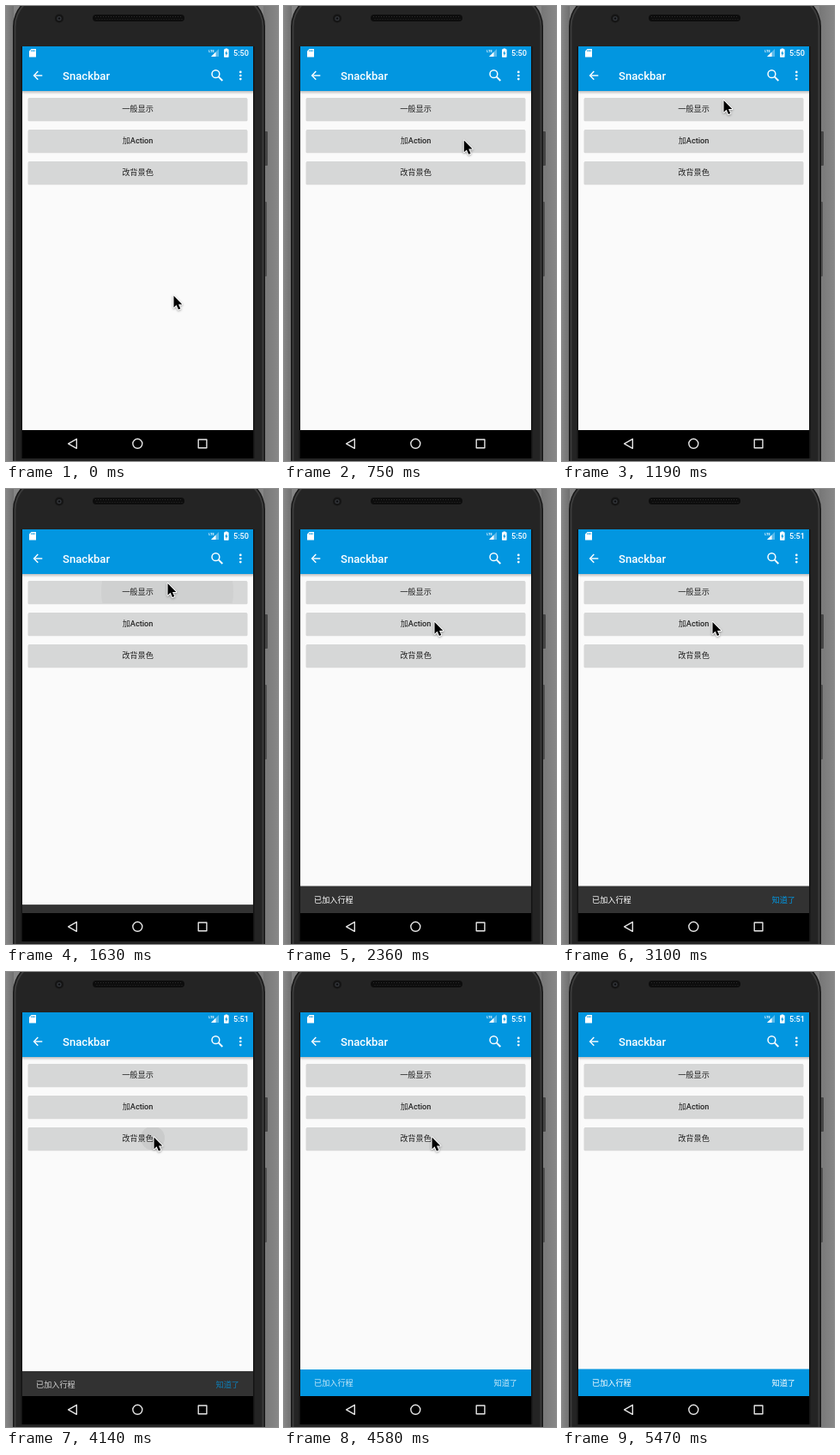
An HTML page with a canvas that plays this animation: 317x530 px, repeating every 5780 ms.

```html
<!DOCTYPE html>
<html lang="zh">
<head>
<meta charset="utf-8">
<title>Snackbar</title>
<style>
html, body { margin: 0; width: 100%; height: 100%; overflow: hidden; background: #858585; }
canvas { display: block; width: 317px; height: 530px; }
</style>
</head>
<body>
<canvas id="stage"></canvas>
<script>
const W = 317, H = 530, LOOP = 5780;
const BLUE = '#0296e0', DARK = '#323232', WHITE = '#fff';
const LATIN = 'Roboto, "Noto Sans", sans-serif';
const HAN = '"Noto Sans CJK SC", "Noto Sans CJK", "Noto Sans CJK JP", sans-serif';
const BODY = 9.16;

const TICKS = [0, 150, 300, 450, 600, 750, 900, 1050, 1190, 1340, 1480, 1630, 1780,
  1920, 2070, 2220, 2360, 2510, 2660, 2810, 2960, 3100, 3250, 3390, 3540, 3690, 3840,
  3990, 4140, 4290, 4430, 4580, 4730, 4880, 5030, 5180, 5320, 5470];

// Pointer path: time, x, y
const PATH = [
  [0, 195, 337], [150, 195, 337], [450, 216, 174], [600, 216, 174],
  [1050, 190, 105], [1190, 188, 109.5], [1780, 188, 109.5], [2360, 175, 154.5],
  [3250, 175, 154.5], [4000, 172, 192], [4730, 172, 192], [5400, 286, 534], [LOOP, 286, 560]
];

const BUTTONS = [
  { y: 107, han: '一般显示', latin: '' },
  { y: 144, han: '加', latin: 'Action' },
  { y: 181, han: '改背景色', latin: '' }
];
const TAPS = [
  { at: 1430, x: 188, row: 0 },
  { at: 2470, x: 175, row: 1 },
  { at: 4080, x: 171, row: 2 }
];
const BARS = [
  { show: 1560, hide: 2590, fill: DARK },
  { show: 2840, hide: 4100, fill: DARK, action: BLUE },
  { show: 4370, hide: Infinity, fill: BLUE, action: WHITE }
];

const canvas = document.getElementById('stage');
const ratio = window.devicePixelRatio || 1;
canvas.width = W * ratio;
canvas.height = H * ratio;
const c = canvas.getContext('2d');

const clamp = v => Math.max(0, Math.min(1, v));
const smooth = v => v * v * (3 - 2 * v);

// Fast-out, slow-in: cubic bezier (.4, 0, .2, 1)
function glide(v) {
  if (v <= 0 || v >= 1) return clamp(v);
  let lo = 0, hi = 1, s = 0.5;
  for (let i = 0; i < 20; i++) {
    s = (lo + hi) / 2;
    const x = 1.2 * s * (1 - s) ** 2 + 0.6 * s * s * (1 - s) + s ** 3;
    if (x < v) lo = s; else hi = s;
  }
  return s * s * (3 - 2 * s);
}

function rect(x, y, w, h, fill) {
  c.fillStyle = fill;
  c.fillRect(x, y, w, h);
}

function round(x, y, w, h, r, fill) {
  c.beginPath();
  c.roundRect(x, y, w, h, r);
  c.fillStyle = fill;
  c.fill();
}

function disc(x, y, r, fill) {
  c.beginPath();
  c.arc(x, y, r, 0, 7);
  c.fillStyle = fill;
  c.fill();
}

function trace(points, close) {
  c.beginPath();
  points.forEach(([x, y], i) => i ? c.lineTo(x, y) : c.moveTo(x, y));
  if (close) c.closePath();
}

function shape(points, fill) {
  trace(points, true);
  c.fillStyle = fill;
  c.fill();
}

function line(points, width, color, close) {
  trace(points, close);
  c.lineWidth = width;
  c.strokeStyle = color;
  c.stroke();
}

function text(str, x, y, font, fill, align = 'left') {
  c.font = font;
  c.fillStyle = fill;
  c.textAlign = align;
  c.fillText(str, x, y);
}

const han = (str, x, y, fill, align) => text(str, x, y, `${BODY}px ${HAN}`, fill, align);

function fade(x0, x1, ...colors) {
  const g = c.createLinearGradient(x0, 0, x1, 0);
  colors.forEach((col, i) => g.addColorStop(i / (colors.length - 1), col));
  return g;
}

function drawPhone() {
  rect(0, 0, W, H, '#858585');
  rect(0, 0, 9, H, fade(0, 9, '#868686', '#6f6f6f'));
  rect(300, 0, 17, H, fade(300, 317, '#777', '#878787'));
  round(301, 146, 4, 40, 1, '#454545');
  round(301, 228, 3, 87, 1, '#505050');
  round(8, -14, 294, 640, 38, '#161616');
  round(9.5, -12.5, 291, 640, 36.5, '#3b3b3b');
  round(11.5, -11, 287, 640, 35, '#242424');
  rect(17.5, 47, 1.5, 480, '#141414');
  rect(288, 47, 1.5, 480, '#141414');

  disc(62, 14.5, 5, '#151515');
  disc(62, 14.5, 2.6, '#33363a');
  disc(62, 14.5, 1.2, '#0c0c0e');
  round(101, 10, 107, 8, 4, '#0d0d0d');
  for (let x = 104; x < 206; x += 3) {
    rect(x, 12, 1, 1, '#2b2b2b');
    rect(x + 1.5, 15, 1, 1, '#2b2b2b');
  }
}

function drawStatus(clock) {
  shape([[29.5, 50], [35, 50], [35, 59.5], [27, 59.5], [27, 52.5]], WHITE);
  for (let i = 0; i < 3; i++) rect(29.3 + i * 1.7, 51.2, 0.9, 2, BLUE);

  shape([[248, 50], [248, 59], [239, 59]], 'rgba(255,255,255,.35)');
  shape([[244.5, 53.5], [244.5, 59], [239, 59]], WHITE);
  text('LTE', 236.2, 54, `bold 4px ${LATIN}`, WHITE);

  rect(255.5, 49.5, 2.6, 1.5, WHITE);
  round(254, 50.3, 5.6, 9.4, 0.6, WHITE);
  shape([[257.3, 51.7], [255.2, 55.5], [256.5, 55.5], [256.3, 58.2],
    [258.5, 54.4], [257.2, 54.4]], BLUE);
  text(clock, 283, 58.3, `500 ${BODY}px ${LATIN}`, WHITE, 'right');
}

function drawAppBar() {
  const shadow = c.createLinearGradient(0, 99, 0, 103);
  shadow.addColorStop(0, 'rgba(0,0,0,.24)');
  shadow.addColorStop(1, 'rgba(0,0,0,0)');
  rect(19, 99, 269, 4, shadow);
  rect(19, 47, 269, 52, BLUE);

  line([[42.3, 81], [32.8, 81]], 1.4, WHITE);
  line([[37.3, 76.1], [32.6, 81], [37.3, 85.7]], 1.4, WHITE);
  text('Snackbar', 66, 85.7, `500 13.1px ${LATIN}`, WHITE);

  c.beginPath();
  c.arc(244.4, 79.2, 4.4, 0, 7);
  c.lineWidth = 1.5;
  c.strokeStyle = WHITE;
  c.stroke();
  line([[247.6, 82.4], [252.3, 87]], 1.9, WHITE);
  for (const y of [76.9, 81, 85.1]) disc(273.3, y, 1.35, WHITE);
}

function drawButton({ y, han: label, latin }, row, t) {
  round(25.5, y + 0.6, 256, 26.6, 1.5, 'rgba(0,0,0,.14)');
  round(26, y, 255, 26, 1.3, '#d6d7d7');

  for (const tap of TAPS) {
    const age = t - tap.at;
    if (tap.row !== row || age < 0 || age > 340) continue;
    c.save();
    c.beginPath();
    c.rect(26, y, 255, 26);
    c.clip();
    const alpha = 0.055 * (1 - clamp((age - 80) / 260));
    disc(tap.x, y + 12.5, 14 + Math.max(0, age - 60) * 0.45, `rgba(0,0,0,${alpha})`);
    c.restore();
  }

  const bold = `500 ${BODY}px ${LATIN}`;
  c.font = bold;
  const tail = c.measureText(latin).width;
  c.font = `${BODY}px ${HAN}`;
  const left = 153.5 - (c.measureText(label).width + tail) / 2;
  han(label, left, y + 16.3, '#222');
  if (latin) text(latin, left + tail * 0 + c.measureText(label).width, y + 16.3, bold, '#222');
}

function drawBar({ show, hide, fill, action }, t) {
  if (t <= show || t >= hide + 250) return;
  const lift = glide((t - show) / 250) - glide((t - hide) / 250);
  const y = 494 - 31.5 * lift;
  rect(19, y, 269, 32, fill);
  c.save();
  c.globalAlpha = clamp((t - show - 70) / 180) * (1 - clamp((t - hide) / 180));
  han('已加入行程', 35, y + 19.4, WHITE);
  if (action) han('知道了', 272, y + 19.4, action, 'right');
  c.restore();
}

function drawNav() {
  rect(19, 494, 269, 33, '#000');
  c.lineJoin = 'round';
  line([[72.6, 509.8], [82.3, 504.3], [82.3, 515.3]], 1.4, '#e6e6e6', true);
  c.beginPath();
  c.arc(153.3, 509.8, 5.5, 0, 7);
  c.stroke();
  c.strokeRect(224.2, 505, 9.7, 9.7);
  c.lineJoin = 'miter';
}

function pointerAt(t) {
  let i = 1;
  while (PATH[i][0] < t) i++;
  const [t0, x0, y0] = PATH[i - 1], [t1, x1, y1] = PATH[i];
  const k = smooth((t - t0) / (t1 - t0));
  return [x0 + (x1 - x0) * k, y0 + (y1 - y0) * k];
}

function drawPointer(x, y) {
  const arrow = [[0.5, 0.5], [0.5, 14.2], [3.6, 11.3], [5.9, 16.6], [8.3, 15.6],
    [6, 10.4], [10.3, 10.4]].map(([px, py]) => [x + px, y + py]);
  c.save();
  c.shadowColor = 'rgba(0,0,0,.35)';
  c.shadowBlur = 2.5 * ratio;
  c.shadowOffsetY = ratio;
  c.lineJoin = 'round';
  line(arrow, 2, WHITE, true);
  c.restore();
  shape(arrow, '#000');
}

function draw(t) {
  c.setTransform(ratio, 0, 0, ratio, 0, 0);
  drawPhone();
  rect(19, 47, 269, 447, '#fafafa');
  drawAppBar();
  drawStatus(t < 2810 ? '5:50' : '5:51');
  BUTTONS.forEach((b, row) => drawButton(b, row, t));
  BARS.forEach(bar => drawBar(bar, t));
  drawNav();
  drawPointer(...pointerAt(t));
}

const start = performance.now();
function frame() {
  const t = (performance.now() - start) % LOOP;
  draw(TICKS.filter(tick => tick <= t).pop());
  requestAnimationFrame(frame);
}
frame();
</script>
</body>
</html>
```
